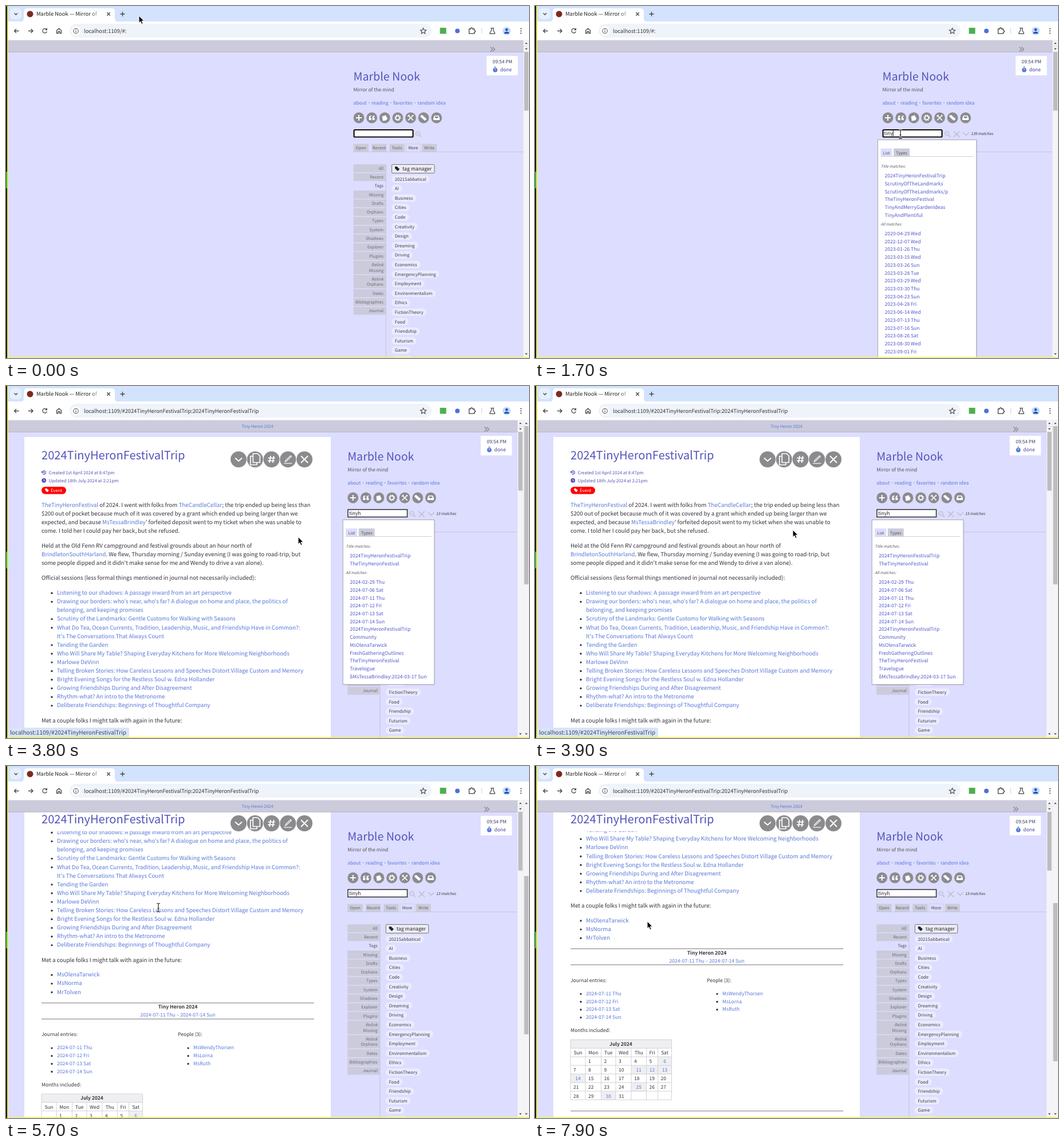
These frames come from a looping animation (913x614 px, 8 s). An HTML page:

```html
<!DOCTYPE html>
<html lang="en">
<head>
<meta charset="utf-8">
<title>Notebook search</title>
<style>
html, body { margin: 0; width: 100%; height: 100%; overflow: hidden; background: #ddddff; }
svg { display: block; width: 100vw; height: 100vh; }
text {
  font-family: "Noto Sans CJK JP", "Noto Sans CJK SC", "Noto Sans CJK", "Noto Sans", sans-serif;
  text-rendering: geometricPrecision;
  white-space: pre;
}
</style>
</head>
<body>
<svg id="stage" viewBox="0 0 913 614"></svg>
<script>
const PAGE = '#ddddff', TAB = '#cbcbdc', LINK = '#5778d8', HEAD = '#5454bd', MENU = '#5157c8', INK = '#33333c';
const SITE = 'Marble Nook', FEST = 'Tiny Heron 2024', TRIP = '2024TinyHeronFestivalTrip';
const HOST = 'localhost:1109/#', QUERY = 'tinyh';

// Text is placed by the middle of its capitals.
const text = (x, y, s, size = 8.5, fill = INK, more = '') =>
  `<text x="${x}" y="${(y + size * .37).toFixed(2)}" font-size="${size}" fill="${fill}" ${more}>${s}</text>`;
const rect = (x, y, w, h, fill, more = '') =>
  `<rect x="${x}" y="${y}" width="${w}" height="${h}" fill="${fill}" ${more}/>`;
const disc = (x, y, r, fill, more = '') => `<circle cx="${x}" cy="${y}" r="${r}" fill="${fill}" ${more}/>`;
const line = (d, color = '#444', width = 1.3, more = '') =>
  `<path d="${d}" fill="none" stroke="${color}" stroke-width="${width}" ${more}/>`;
const shape = (d, fill, more = '') => `<path d="${d}" fill="${fill}" ${more}/>`;
const group = (id, body, more = '') => `<g id="${id}" ${more}>${body}</g>`;
const at = (x, y, body, scale = 1) => `<g transform="translate(${x} ${y}) scale(${scale})">${body}</g>`;
const link = s => `<tspan fill="${LINK}">${s}</tspan>`;
const MID = 'text-anchor="middle"', END = 'text-anchor="end"', ITALIC = 'font-style="italic"', BOLD = 'font-weight="700"';

const tagGlyph = fill => shape('M-4 -4h3.4l4.8 4.4-3.4 3.6-4.8-4.6z', fill);
const arrowUp = (x, y) => shape(`M${x - 2.3} ${y + 1.3}h4.6l-2.3-2.8z`, '#505050');
const arrowDown = (x, y) => shape(`M${x - 2.3} ${y - 1.3}h4.6l-2.3 2.8z`, '#505050');

function browserBar() {
  return rect(0, 0, 913, 28, '#d3e3fd') + rect(0, 27, 913, 32.5, '#fff')
    + rect(7, 4, 20, 19, '#e6effd', 'rx="6"') + line('M14.5 12.5l2.8 2.8 2.8-2.8')
    + shape('M25 27.5q6 0 6-6V10q0-6 6-6h147q6 0 6 6v11.5q0 6 6 6z', '#fff')
    + disc(42, 14, 5.5, '#7c2a20')
    + text(53, 14, `${SITE} — Mirror of`, 9.4, '#222', 'clip-path="url(#tabClip)"')
    + rect(146, 6, 21, 18, 'url(#fade)')
    + line('M176.3 11.3l5.4 5.4m0-5.4l-5.4 5.4M203.5 10v8m-4-4h8')
    + line('M22.5 43.5h-8m3.5-3.5l-3.5 3.5 3.5 3.5M39 43.5h8m-3.5-3.5l3.5 3.5-3.5 3.5')
    + line('M70.8 41a3.8 3.8 0 1 0 .5 3.5M71.3 38.8v2.8h-2.8')
    + line('M88.5 47.5v-5l4-3.2 4 3.2v5h-2.7v-3h-2.6v3z')
    + rect(111, 31, 632, 24, '#eff3fa', 'rx="12"') + disc(122, 43.5, 8, '#fff')
    + disc(122, 43.5, 4.3, 'none', 'stroke="#444"') + line('M122 43v2.8m0-5.2v1.2', '#444', 1.1)
    + group('url', '')
    + line('M728.5 38.5l1.5 3.3 3.6.3-2.7 2.4.8 3.5-3.2-1.9-3.2 1.9.8-3.5-2.7-2.4 3.6-.3z', '#444', 1.1)
    + rect(757.5, 38, 11, 10.5, '#4bb04c') + disc(788, 43.5, 4, '#4b72d9')
    + line('M808.5 40h2.7q0-2 1.6-2t1.6 2h3v2.6q2 0 2 1.6t-2 1.6v2.4h-8.9z')
    + rect(830, 38, 1, 10, '#c5d6f2')
    + line('M846 38.5h6m-4.5 0v3.5l-3 5.5q-.3.9.7.9h7.6q1 0 .7-.9l-3-5.5v-3.5', '#444', 1.2)
    + disc(874, 43.5, 7, '#c2d8fb') + disc(874, 41.3, 2.3, '#1657b8') + shape('M869.5 48.3q0-3.5 4.5-3.5t4.5 3.5z', '#1657b8')
    + [39.5, 43.5, 47.5].map(y => disc(899, y, 1.1, '#444')).join('');
}

function sideTabs() {
  const top = [['Open', 606.5, 26.5], ['Recent', 638.5, 26], ['Tools', 669.5, 26], ['More', 698, 25.5], ['Write', 726, 26]];
  const names = 'All,Recent,Tags,Missing,Drafts,Orphans,Types,System,Shadows,Explorer,Plugins,Relink/Missing,Relink/Orphans,Dates,Bibliographies,Journal'.split(',');
  let out = rect(606, 254, 297, 1, '#c6c6d9'), y = 276.2;
  for (const [s, x, w] of top) {
    const on = s === 'More';
    out += rect(x, 240.5, w, 14, on ? PAGE : TAB, on ? 'stroke="#cfcfe2" stroke-width=".8"' : '')
      + text(x + w / 2, 247.7, s, 7.3, on ? '#444' : '#666', MID);
  }
  for (const name of names) {
    const [first, second] = name.split('/'), step = second ? 24.9 : 15.28, on = name === 'Tags';
    if (!on) out += rect(606.5, y, 56.5, step - 1.4, TAB);
    out += text(659, y + 6.9, first, 7.3, on ? '#4a4a52' : '#6b6b74', END + (second ? ' ' + ITALIC : ''));
    if (second) out += text(659, y + 16.6, second, 7.3, '#6b6b74', END);
    y += step;
  }
  return out + rect(662.8, 276, 1, 340, '#c6c6d9');
}

function tagList() {
  const tags = '2021Sabbatical,AI,Business,Cities,Code,Creativity,Design,Dreaming,Driving,Economics,EmergencyPlanning,Employment,Environmentalism,Ethics,FictionTheory,Food,Friendship,Futurism,Game,Garden'.split(',');
  return rect(673.5, 276.5, 74.5, 15, '#ececf4', 'rx="1.5" stroke="#777"') + at(683, 284, tagGlyph('#223'))
    + text(692, 284, 'tag manager', 8.75, '#222')
    + tags.map((s, i) => rect(673, 295.2 + 16.6 * i, 10, 13, '#ebebff', 'rx="6.5" class="pill"')
      + text(678.8, 301.7 + 16.6 * i, s, 7.68, '#3c3c48')).join('');
}

function sideIcons() {
  const glyphs = [
    line('M-5 0h10M0-5v10', '#fff', 2),
    shape('M-5 4v-4q0-4 4-4v1.5q-1.8.5-1.8 2.5h1.8v4zm6 0v-4q0-4 4-4v1.5q-1.8.5-1.8 2.5h1.8v4z', '#fff'),
    shape('M-4.5-2.5l6-2 3.3 6-2.3 3-6 1z', '#fff'),
    disc(0, 0, 3.3, 'none', 'stroke="#fff" stroke-width="1.8"') + disc(0, 0, 4.9, 'none', 'stroke="#fff" stroke-width="1.5" stroke-dasharray="1.9 1.95"'),
    line('M-4-4l8.5 8.5M4.5-4.5l-9 9M-5-2.5l3-2.5M3-5l2 2', '#fff', 1.7),
    shape('M-5.5-4l3-1 8 7-3.3 3.3-7.7-7z', '#fff'),
    shape('M-5.5 4v-4l2-4h7l2 4v4zM-3.5 0h2q1.5 2.5 3 0h2l-1.2-2.6h-4.6z', '#fff', 'fill-rule="evenodd"')
  ];
  return glyphs.map((g, i) => at(616 + 22.6 * i, 195, disc(0, 0, 9.4, '#8b8b90') + g)).join('');
}

function popup(id, width, height, titles, all) {
  let y = 296, out = rect(598.5, 233.5, width, height, '#fff', 'stroke="#a9a9b4" filter="url(#soft)"')
    + rect(603.5, 248.5, 20, 14, PAGE) + rect(626, 248.5, 28, 14, TAB) + rect(603.5, 262, width - 10, 1, '#cfcfdc')
    + text(613.5, 256, 'List', 7.3, '#555', MID) + text(640, 256, 'Types', 7.3, '#555', MID)
    + text(603.5, 280, 'Title matches:', 6.6, '#555', ITALIC);
  if (id === 'few') out += group('glow', rect(603.5, 289, width - 10, 13.5, LINK));
  const row = s => { out += text(610.5, y, s, 8.5, MENU, 'class="hit"'); y += 13.72; };
  titles.forEach(row);
  out += text(603.5, y + 2.3, 'All matches:', 6.6, '#555', ITALIC);
  y += 18.5;
  all.forEach(row);
  return group(id, out);
}

function sidebar() {
  const many = '2020-04-29 Wed,2022-12-07 Wed,2023-01-26 Thu,2023-03-15 Wed,2023-03-26 Sun,2023-03-28 Tue,2023-03-29 Wed,2023-03-30 Thu,2023-04-23 Sun,2023-04-28 Fri,2023-06-14 Wed,2023-07-13 Thu,2023-07-16 Sun,2023-08-26 Sat,2023-08-30 Wed,2023-09-01 Fri'.split(',');
  const few = `2024-02-29 Thu,2024-07-06 Sat,2024-07-11 Thu,2024-07-12 Fri,2024-07-13 Sat,2024-07-14 Sun,${TRIP},Community,MsOlenaTarwick,FreshGatheringOutlines,TheTinyHeronFestival,Travelogue,δMsTessaBrindley:2024-03-17 Sun`.split(',');
  const titles = [TRIP, 'ScrutinyOfTheLandmarks', 'ScrutinyOfTheLandmarks/p', 'TheTinyHeronFestival', 'TinyAndMerryGardenIdeas', 'TinyAndPlentiful'];
  return line('M845.5 71.5l4 4-4 4m4-8l4 4-4 4', '#85858f', 1.2)
    + rect(903.4, 59.5, 10, 555, '#f4f4f6') + rect(904.6, 80, 7.5, 102.5, '#bdbdc0')
    + arrowUp(908.3, 65) + arrowDown(908.3, 75) + arrowDown(908.3, 607) + rect(903.4, 70, 10, .6, '#d0d0d4')
    + rect(839, 87, 54.5, 34, '#fff') + text(884, 97, '09:54 PM', 8.25, '#3a3a6a', END) + text(883, 111, 'done', 8.5, '#4444a0', END)
    + disc(854, 111.6, 3.9, LINK) + rect(852.5, 105.8, 3, 1.3, LINK) + line('M854 111.6v-2.4', '#fff', 1)
    + text(606.5, 123, SITE, 19.6, HEAD) + text(606.5, 146, 'Mirror of the mind', 8.46, '#555')
    + text(606.5, 169, ['about', 'reading', 'favorites', 'random idea'].map(link).join(' · '), 8.35)
    + sideIcons()
    + rect(607, 215.5, 104, 13.5, '#fff')
    + group('focus', rect(607.5, 216, 103, 12.5, 'none', 'stroke="#111" stroke-width="2.2" rx="1.5"'))
    + group('blur', rect(607.2, 215.5, 103.6, 13, 'none', 'stroke="#2c2c34" stroke-width="1.5"'))
    + text(609.5, 222, '', 8.5, '#222', 'id="query"') + group('caret', rect(0, 217, 1, 10, '#111'))
    + line('M722 225.5l3 3', '#c3c3d4', 1.8) + disc(719, 222.5, 3.6, 'none', 'stroke="#c3c3d4" stroke-width="1.5"') + line('M717.2 222.5h3.6', '#c3c3d4', 1)
    + sideTabs() + tagList()
    + group('found', line('M731 218.5l10 10m0-10l-10 10M747 220.5l5.5 5 5.5-5', '#bcbccb', 1.5)
      + text(761, 222.5, '', 6.6, '#333', `id="count" ${ITALIC}`))
    + popup('many', 172, 385, titles, many)
    + popup('few', 159.5, 287, [TRIP, 'TheTinyHeronFestival'], few);
}

function calendar() {
  const edge = [62, 88, 115.5, 141, 168, 194.5, 214.5, 238.5], top = 817;
  const linked = [6, 11, 12, 13, 14, 25, 30];
  let out = rect(62, top, 176.5, 14.7, '#efeff1') + text(150, top + 7.3, 'July 2024', 8.5, INK, MID + ' ' + BOLD), grid = '';
  'Sun Mon Tue Wed Thu Fri Sat'.split(' ').forEach((s, i) => {
    out += text((edge[i] + edge[i + 1]) / 2, top + 22.5, s, 8.4, INK, MID);
  });
  for (let day = 1; day <= 31; day++) {
    const col = day % 7, row = Math.floor(day / 7), y = top + 37.5 + 15.1 * row, mid = (edge[col] + edge[col + 1]) / 2;
    if (linked.includes(day))
      out += rect(edge[col], y - 7.5, edge[col + 1] - edge[col], 15, '#efeff1') + text(mid, y, day, 8.4, LINK, MID);
    else out += text(edge[col] + 5, y, day, 8.4);
  }
  for (let i = 0; i < 8; i++) {
    const y = top + (i ? 14.7 + 15 * (i - 1) : 0);
    grid += `M62 ${y}H238.5M${edge[i]} ${top + (i % 7 ? 14.7 : 0)}V${top + 104.7}`;
  }
  return out + line(grid, '#cfcfd4', .9);
}

function article() {
  const body = 9.77, small = 8.6;
  const sessions = [
    'Listening to our shadows: A passage inward from an art perspective',
    "Drawing our borders: who's near, who's far? A dialogue on home and place, the politics of|belonging, and keeping promises",
    'Scrutiny of the Landmarks: Gentle Customs for Walking with Seasons',
    "What Do Tea, Ocean Currents, Tradition, Leadership, Music, and Friendship Have in Common?:|It's The Conversations That Always Count",
    'Tending the Garden',
    'Who Will Share My Table? Shaping Everyday Kitchens for More Welcoming Neighborhoods',
    'Marlowe DeVinn',
    'Telling Broken Stories: How Careless Lessons and Speeches Distort Village Custom and Memory',
    'Bright Evening Songs for the Restless Soul w. Edna Hollander',
    'Growing Friendships During and After Disagreement',
    'Rhythm-what? An intro to the Metronome',
    'Deliberate Friendships: Beginnings of Thoughtful Company'
  ];
  const prose = [
    [207, `${link('TheTinyHeronFestival')} of 2024. I went with folks from ${link('TheCandleCellar')}; the trip ended up being less than`],
    [222.2, '$200 out of pocket because much of it was covered by a grant which ended up being larger than we'],
    [237.3, `expected, and because ${link('MsTessaBrindley')}' forfeited deposit went to my ticket when she was unable to`],
    [252.4, 'come. I told her I could pay her back, but she refused.'],
    [278.5, 'Held at the Old Fenn RV campground and festival grounds about an hour north of'],
    [293.6, `${link('BrindletonSouthHarland')}. We flew, Thursday morning / Sunday evening (I was going to road-trip, but`],
    [308.8, "some people dipped and it didn't make sense for me and Wendy to drive a van alone)."],
    [334.7, 'Official sessions (less formal things mentioned in journal not necessarily included):'],
    [583, 'Met a couple folks I might talk with again in the future:']
  ];
  const bullets = (items, x, y, step, size) => items.map(item => disc(x, y + .8, 1.7, INK)
    + item.split('|').map(s => { const t = text(x + 9, y, s, size, LINK); y += step; return t; }).join('')).join('');
  return rect(32, 89, 535, 1000, '#fff')
    + line('M63 151a3.2 3.2 0 1 1 1 2.3M62 149l1 2.2 2.2-.8M66.2 149v2.3l1.6 1', HEAD, 1.1)
    + disc(66.2, 164.7, 3.9, HEAD) + line('M66.2 162.5v2.4l1.7.9', '#fff', .9)
    + text(74.5, 151, 'Created 1st April 2024 at 8:47pm', 7.7, HEAD) + text(74.5, 164.7, 'Updated 18th July 2024 at 2:21pm', 7.7, HEAD)
    + rect(62, 175.7, 43, 12.8, '#f00', 'rx="6.4"') + at(71.5, 182, tagGlyph('#fff'), .8) + text(78, 182, 'Event', 7.68, '#fff')
    + prose.map(([y, s]) => text(62, y, s, body)).join('')
    + bullets(sessions, 80, 360.5, 15.1, body)
    + bullets(['MsOlenaTarwick', 'MsNorma', 'MrTolven'], 80, 608.7, 15.1, body)
    + line('M62 658.3H538M62 686.3H538M62 941.3H538', '#77777c', 1)
    + text(300, 665, FEST, 8.6, INK, MID + ' ' + BOLD)
    + text(300, 679.3, '2024-07-11 Thu – 2024-07-14 Sun', 8.55, LINK, MID)
    + text(62, 713, 'Journal entries:', small) + text(300, 713, 'People (3):', small)
    + bullets(['2024-07-11 Thu', '2024-07-12 Fri', '2024-07-13 Sat', '2024-07-14 Sun'], 80, 736.3, 13.7, small)
    + bullets(['MsWendyThorsen', 'MsLorna', 'MsRuth'], 318, 736.3, 13.7, small)
    + text(62, 800.7, 'Months included:', small) + calendar();
}

function articleHead() {
  const glyphs = [
    line('M-6-2.5l6 5.5 6-5.5', '#fff', 2),
    line('M-3.5-10h8l4 4v11.5h-12zM-3.5-5.5h-4.5v15h11v-4', '#fff', 1.7),
    line('M-1.5-6l-2 12M4-6l-2 12M-6-2.3h12M-6.5 2.3h12', '#fff', 1.8),
    line('M-7 7h14', '#fff', 1.2) + line('M-5 4l1-2.5 8.5-8 1.5 1.5-8.5 8z', '#fff', 1.1),
    line('M-6-6l12 12m0-12l-12 12', '#fff', 2)
  ];
  return rect(32, 92, 535, 50, '#fff') + text(62, 121, TRIP, 20.1, HEAD)
    + glyphs.map((g, i) => at(406 + 28.75 * i, 128, disc(0, 0, 14, '#8b8b8e') + g)).join('');
}

const OUTLINE = 'stroke="#fff" stroke-width="1" stroke-linejoin="round"';
const BEAM = 'M-3-7.5q3 0 3 1.5v12q0 1.5-3 1.5M3-7.5q-3 0-3 1.5M3 7.5q-3 0-3-1.5M-1.5 1h3';
const pointers = {
  arrow: shape('M0 0v12.5l2.8-2.6 2.1 4.6 2.2-1-2.1-4.4h4z', '#000', OUTLINE),
  beam: line(BEAM, '#fff', 2.6) + line(BEAM, '#111', 1.1),
  hand: shape('M-1.3 1q0-1.4 1.3-1.4t1.3 1.4v4l4.5 1q1.7.5 1.5 2l-.8 5.5h-6.5l-4.3-5q.6-1.6 3 .2z', '#000', OUTLINE)
};

document.getElementById('stage').innerHTML = `<defs>
    <clipPath id="tabClip"><rect x="50" y="4" width="116" height="20"/></clipPath>
    <clipPath id="pageClip"><rect x="4" y="80" width="900" height="534"/></clipPath>
    <linearGradient id="fade"><stop stop-color="#fff" stop-opacity="0"/><stop offset="1" stop-color="#fff"/></linearGradient>
    <filter id="soft"><feDropShadow dx=".7" dy=".7" stdDeviation=".8" flood-opacity=".1"/></filter></defs>`
  + rect(0, 0, 913, 614, PAGE)
  + group('story', group('article', article()) + group('head', articleHead()), 'clip-path="url(#pageClip)"')
  + rect(0, 59.5, 913, 20.5, TAB) + rect(0, 79.7, 904, 1, '#b2b2c4')
  + group('crumb', text(439, 70, FEST, 7.3, LINK, MID))
  + group('side', sidebar())
  + group('scroller', rect(903.3, 59.5, 10, 555, '#f4f4f6') + group('thumb', rect(904.6, 70, 7.5, 276, '#bdbdc0'))
    + arrowUp(908.3, 65) + arrowDown(908.3, 607))
  + browserBar()
  + group('status', rect(4, 596, 211, 17, '#d7e5fc', 'rx="2"') + text(7, 604, HOST + TRIP, 10.05, '#444'))
  + rect(0, 0, 2, 614, '#15150a') + rect(0, 289, 2, 29, '#2eb82a') + rect(2, 0, 1.7, 614, '#ecec3a') + rect(2, 612.3, 911, 1.7, '#f2f26a')
  + Object.entries(pointers).map(([id, s]) => group(id, s)).join('');

const $ = id => document.getElementById(id);
const show = (id, on) => $(id).setAttribute('visibility', on ? 'inherit' : 'hidden');
const move = (id, x, y) => $(id).setAttribute('transform', `translate(${x} ${y})`);

for (const pill of document.querySelectorAll('.pill'))
  pill.setAttribute('width', pill.nextElementSibling.getComputedTextLength() + 11.6);
const hits = $('few').querySelectorAll('.hit');

// time, x, y, pointer kind from then on
const path = [
  [0, 232, 17, 'arrow'], [100, 232, 17, 'arrow'], [400, 440, 140, 'arrow'], [600, 600, 230, 'arrow'], [700, 628, 232, 'beam'],
  [800, 638, 224, 'beam'], [2400, 638, 224, 'beam'], [2500, 643, 240, 'arrow'], [2700, 662, 290, 'hand'],
  [2800, 672, 312, 'hand'], [3000, 682, 299, 'hand'], [3100, 682, 297, 'hand'], [3500, 682, 297, 'hand'],
  [3600, 630, 288, 'arrow'], [3900, 450, 251, 'arrow'], [4300, 390, 303, 'beam'], [4400, 385, 308, 'beam'],
  [4600, 385, 308, 'beam'], [5100, 266, 247, 'beam'], [6400, 266, 247, 'beam'], [6500, 264, 250, 'beam'],
  [6800, 58, 245, 'beam'], [7300, 326, 251, 'beam'], [7500, 326, 251, 'beam'], [7600, 196, 257, 'arrow'],
  [7700, 66, 262, 'arrow'], [7900, 196, 271, 'arrow'], [8000, 196, 271, 'arrow']
];
const keystrokes = [1400, 1500, 1600, 1700, 1900];
const wheel = [[5800, 339.5], [5700, 245], [5600, 115], [0, 0]];

function pointerAt(t) {
  const i = path.findIndex(p => p[0] > t);
  const [t0, x0, y0, kind] = path[i - 1], [t1, x1, y1] = path[i], k = (t - t0) / (t1 - t0);
  return { x: x0 + (x1 - x0) * k, y: y0 + (y1 - y0) * k, kind };
}

function render(t) {
  const open = t >= 3600, focused = t < 3300;
  const typed = QUERY.slice(0, keystrokes.filter(k => t >= k).length);
  const { x, y, kind } = pointerAt(t);
  for (const id in pointers) show(id, id === kind);
  move(kind, x, y);

  $('url').innerHTML = text(136, 43.5, HOST + (t >= 3400 ? `${TRIP}:${TRIP}` : ':'), 9.27, '#333');
  $('query').textContent = typed;
  $('count').textContent = t < 1900 ? '139 matches' : '13 matches';
  show('focus', focused);
  show('blur', !focused);
  const blink = t < 1400 ? t >= 500 && t < 1000 : t < 2400 || t >= 2900;
  show('caret', focused && blink);
  move('caret', 609.5 + (typed ? $('query').getComputedTextLength() : 0), 0);

  show('found', t >= 1700);
  show('many', t >= 1700 && t < 1900);
  show('few', t >= 1900 && t < 4700);
  const hovered = kind === 'hand' ? Math.floor((y - 289) / 13.72) : -1;
  show('glow', t < 4700 && hovered >= 0);
  move('glow', 0, Math.max(hovered, 0) * 13.72);
  hits.forEach((hit, i) => hit.setAttribute('fill', i === hovered ? '#fff' : MENU));

  for (const id of ['story', 'crumb', 'scroller']) show(id, open);
  show('status', t >= 3300 && t < 4300);
  move('side', open ? -10.3 : 0, 0);
  const scrolled = wheel.find(w => t >= w[0])[1];
  move('article', 0, -scrolled);
  move('head', 0, -Math.min(scrolled, 28));
  move('thumb', 0, scrolled * .498);
}

const start = performance.now();
function tick() {
  const t = (performance.now() - start) % 8000;
  render(Math.floor(t / 100) * 100);
  requestAnimationFrame(tick);
}
tick();
</script>
</body>
</html>
```
